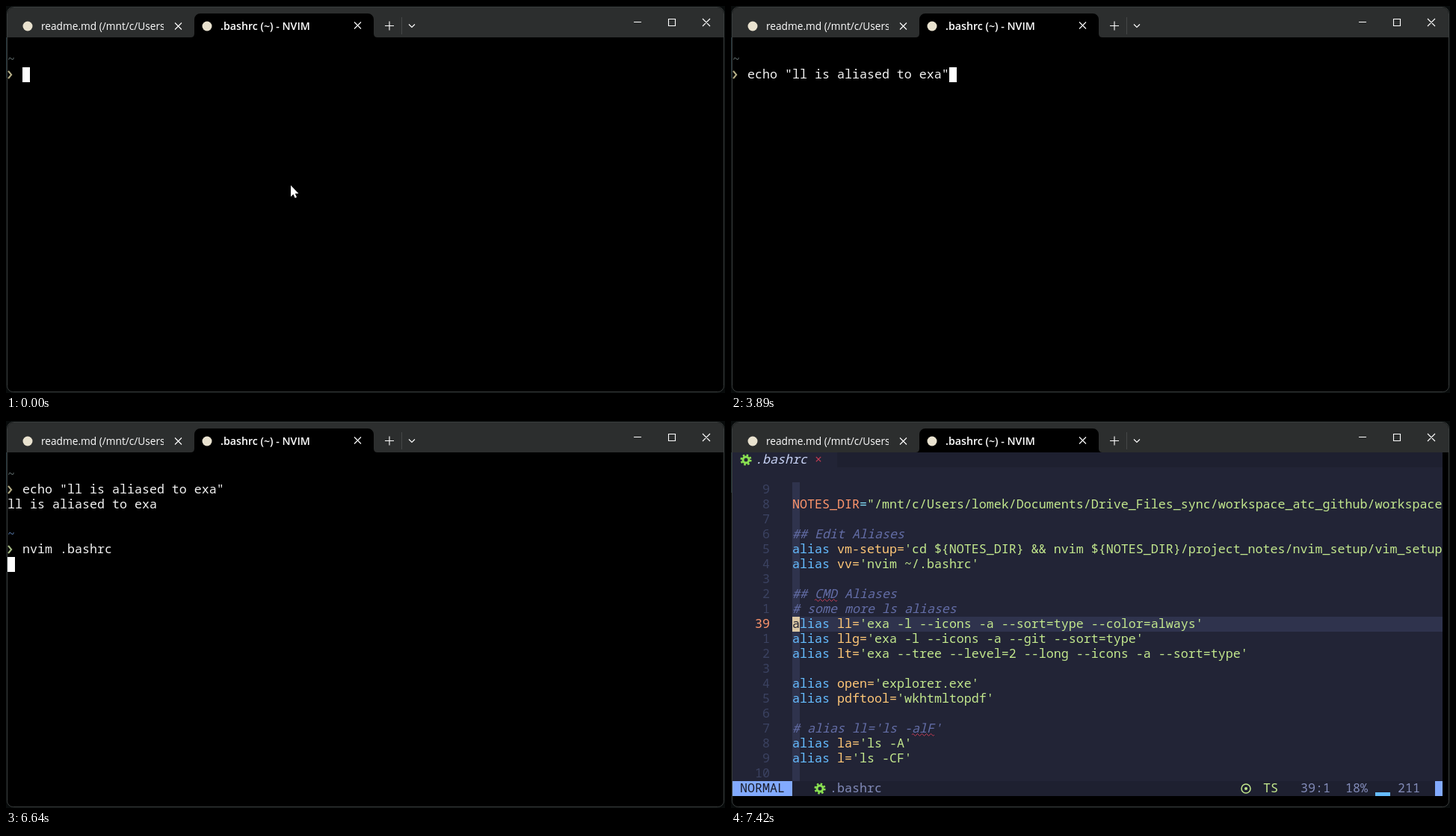
An HTML page that plays this animation: 962 by 518 pixels, repeating every 8 s.

```html
<!DOCTYPE html>
<html lang="en">
<head>
<meta charset="utf-8">
<title>Terminal</title>
<style>
  html, body { margin: 0; width: 100%; height: 100%; overflow: hidden; background: #080b0b; }
  svg { display: block; }
  .ui { font-family: "Open Sans", "Noto Sans", sans-serif; fill: #fff; }
  .mono { font: 16.6667px "Noto Sans Mono", "DejaVu Sans Mono", monospace; white-space: pre; font-variant-ligatures: none; }
  .italic { font-style: italic; }
  .line { fill: none; stroke: #fff; stroke-width: 1.1; }
</style>
</head>
<body>
<svg id="stage" width="962" height="518" viewBox="0 0 962 518">
  <defs>
    <clipPath id="tabClip"><path d="M47 10h164v32H47z"/></clipPath>
    <clipPath id="gridClip"><path d="M2 42h950v460H2z"/></clipPath>
    <g id="cross"><path class="line" d="M-4.5-4.5l9 9m0-9l-9 9"/></g>
    <g id="gear" fill="none" stroke="#89e051">
      <circle r="4" stroke-width="3"/>
      <circle r="6.3" stroke-width="2.6" stroke-dasharray="2.47"/>
    </g>
  </defs>

  <rect x="1.5" y="1.5" width="959" height="515" rx="8" stroke="#3a3e3e"/>
  <path fill="#2c2e2e" d="M2 42V10a8 8 0 0 1 8-8H952a8 8 0 0 1 8 8V42z"/>
  <path d="M247 42q5 0 5-5V18a8 8 0 0 1 8-8H484a8 8 0 0 1 8 8V37q0 5 5 5z"/>
  <path stroke="#1f3034" d="M.5 42v54"/>

  <g fill="#e9e2cf"><circle cx="29" cy="27" r="6.5"/><circle cx="269" cy="27" r="6.5"/></g>
  <text class="ui" x="47" y="32" font-size="13.7" clip-path="url(#tabClip)">readme.md (/mnt/c/Users</text>
  <text class="ui" x="287" y="32" font-size="14.2" font-weight="600">.bashrc (~) - NVIM</text>
  <use href="#cross" x="230.5" y="27"/>
  <use href="#cross" x="470.5" y="26"/>
  <path class="line" d="M507 26.5h12M513 20.5v12M539 24.5l4 4 4-4"/>
  <path stroke="#454747" d="M529.5 15v23"/>
  <path class="line" d="M840 21.5h10M886.5 17.5h9v9h-9zM932 17l10 10m0-10l-10 10"/>

  <g id="grid" clip-path="url(#gridClip)"></g>
</svg>
<script>
const LOOP = 8000, CELL = 10, ROW = 20, LEFT = 2, TOP = 42;
const CLEARED = 6690, EDITOR = 7400, FULL = 7420;
const color = {
  text: '#f2f2f2', bg: '#222436', dark: '#1e2030', line: '#2f334d', number: '#3b4261',
  comment: '#636da6', keyword: '#65bcff', name: '#ffc777', string: '#c3e88d',
  orange: '#ff966c', cyan: '#86e1fc', blue: '#82aaff', red: '#c53b53', muted: '#828bb8'
};
const grid = document.getElementById('grid');
const timed = [];

function add(tag, attrs, from = 0, to = LOOP) {
  const node = document.createElementNS('http://www.w3.org/2000/svg', tag);
  for (const key in attrs) node.setAttribute(key, attrs[key]);
  grid.append(node);
  timed.push({ node, from, to });
  return node;
}

function box(x, y, width, height, fill, from, to) {
  return add('rect', { x, y, width, height, fill }, from, to);
}

// Each run is [text, fill].
function write(col, row, runs, from, to, italic) {
  const text = add('text', {
    class: italic ? 'mono italic' : 'mono',
    x: LEFT + col * CELL, y: TOP + row * ROW + 15
  }, from, to);
  for (const [content, fill] of runs) {
    const span = document.createElementNS(text.namespaceURI, 'tspan');
    span.textContent = content;
    span.setAttribute('fill', fill);
    text.append(span);
  }
}

function prompt(row, tilde, arrow, from) {
  write(0, row - 1, [['~', tilde]], from, CLEARED);
  add('path', {
    d: `M3 ${TOP + row * ROW + 5}l4.2 5-4.2 5`, fill: 'none', stroke: arrow, 'stroke-width': 2
  }, from, CLEARED);
}

function command(row, content, from, to) {
  write(2, row, [[content, color.text]], from, to);
}

function squiggle(col, row) {
  add('path', {
    d: `M${LEFT + col * CELL} ${TOP + row * ROW + 18}q1.5-3 3 0${'t3 0'.repeat(9)}`,
    fill: 'none', stroke: color.red, 'stroke-width': 1
  }, row < 12 ? EDITOR : FULL);
}

function highlight(source) {
  if (source.startsWith('#')) return [[source, color.comment]];
  const alias = source.match(/^(alias)( [\w-]+=)(.*)$/);
  if (alias) return [[alias[1], color.keyword], [alias[2], color.name], [alias[3], color.string]];
  const [name, value] = source.split('=');
  return [[name, color.orange], ['=', color.cyan], [value, color.string]];
}

// Shell session
const echo = 'echo "ll is aliased to exa"', edit = 'nvim .bashrc';
prompt(2, '#5c6868', '#b5ae86', 0);
command(2, 'clear', 1410, 1750);
command(2, edit, 1750, 2200);
command(2, echo, 2200, CLEARED);
write(0, 3, [['ll is aliased to exa', color.text]], 3990, CLEARED);
prompt(6, '#4f6f9c', '#a8bd86', 4060);
command(6, echo, 4900, 5240);
command(6, 'clear', 5240, 5860);
command(6, edit, 5860, CLEARED);

// Caret stops: time, column, row; a stop without a cell hides it.
const stops = [
  [0, 2, 2], [1410, 7, 2], [1750, 14, 2], [2200, 29, 2], [3920, 0, 3], [3990, 0, 4],
  [4060, 2, 6], [4900, 29, 6], [5240, 7, 6], [5860, 14, 6], [6640, 0, 7],
  [CLEARED], [6740, 0, 0], [6960]
];
stops.forEach(([from, col, row], i) => {
  if (col === undefined) return;
  box(LEFT + col * CELL, TOP + row * ROW, CELL, ROW, '#fff', from, stops[i + 1][0]);
});
add('path', { d: 'M381 240v15.2l3.4-3.2 2.3 5 2.3-1-2.2-4.9h4.6z', fill: '#fff' }, 0, 3890);

// Editor backgrounds
box(2, 42, 950, 20, color.dark, EDITOR);
box(2, 42, 140, 20, color.bg, EDITOR);
box(2, 82, 950, 220, color.bg, EDITOR);
box(2, 302, 60, 20, color.bg, EDITOR);
box(2, 62, 950, 20, color.bg, FULL);
box(2, 302, 950, 180, color.bg, FULL);
box(82, 82, 10, 220, color.line, EDITOR);
box(82, 302, 10, 180, color.line, FULL);
box(82, 262, 870, 20, color.line, EDITOR);

// Editor tab
add('use', { href: '#gear', x: 20, y: 52 }, EDITOR);
write(3, 0, [['.bashrc', '#c8d3f5']], EDITOR, LOOP, true);
write(11, 0, [['×', color.red]], EDITOR);

const source = [
  '',
  'NOTES_DIR="/mnt/c/Users/lomek/Documents/Drive_Files_sync/workspace_atc_github/workspace',
  '',
  '## Edit Aliases',
  "alias vm-setup='cd ${NOTES_DIR} && nvim ${NOTES_DIR}/project_notes/nvim_setup/vim_setup",
  "alias vv='nvim ~/.bashrc'",
  '',
  '## CMD Aliases',
  '# some more ls aliases',
  "alias ll='exa -l --icons -a --sort=type --color=always'",
  "alias llg='exa -l --icons -a --git --sort=type'",
  "alias lt='exa --tree --level=2 --long --icons -a --sort=type'",
  '',
  "alias open='explorer.exe'",
  "alias pdftool='wkhtmltopdf'",
  '',
  "# alias ll='ls -alF'",
  "alias la='ls -A'",
  "alias l='ls -CF'",
  ''
];
const current = 9;
source.forEach((content, i) => {
  const row = i + 2;
  const label = String(i === current ? 39 : Math.abs(i - current));
  write(5 - label.length, row, [[label, i === current ? color.orange : color.number]], row < 13 ? EDITOR : FULL);
  if (content) write(8, row, highlight(content), row < 12 + 1 && i < 11 ? EDITOR : FULL, LOOP, content[0] === '#');
});
squiggle(11, 9);
squiggle(24, 18);
box(82, 262, 10, 20, '#dcc8a5', FULL);
write(8, 11, [['a', color.bg]], FULL);

// Status line
box(2, 482, 950, 20, color.dark, FULL);
box(2, 482, 80, 20, color.blue, FULL);
write(1, 22, [['NORMAL', '#1b1d2b']], FULL);
add('use', { href: '#gear', x: 119, y: 492 }, FULL);
write(13, 22, [['.bashrc', color.muted]], FULL);
add('circle', { cx: 689, cy: 492, r: 6, fill: 'none', stroke: color.string, 'stroke-width': 1.5 }, FULL);
add('circle', { cx: 689, cy: 492, r: 2, fill: color.string }, FULL);
write(71, 22, [['TS', color.string]], FULL);
write(76, 22, [['39:1  18%', color.muted]], FULL);
box(862, 497, 20, 5, color.keyword, FULL);
write(89, 22, [['211', color.muted]], FULL);
box(942, 482, 10, 20, color.blue, FULL);

function render(now) {
  const time = now % LOOP;
  for (const { node, from, to } of timed) {
    node.style.visibility = time >= from && time < to ? 'visible' : 'hidden';
  }
  requestAnimationFrame(render);
}
render(performance.now());
</script>
</body>
</html>
```
